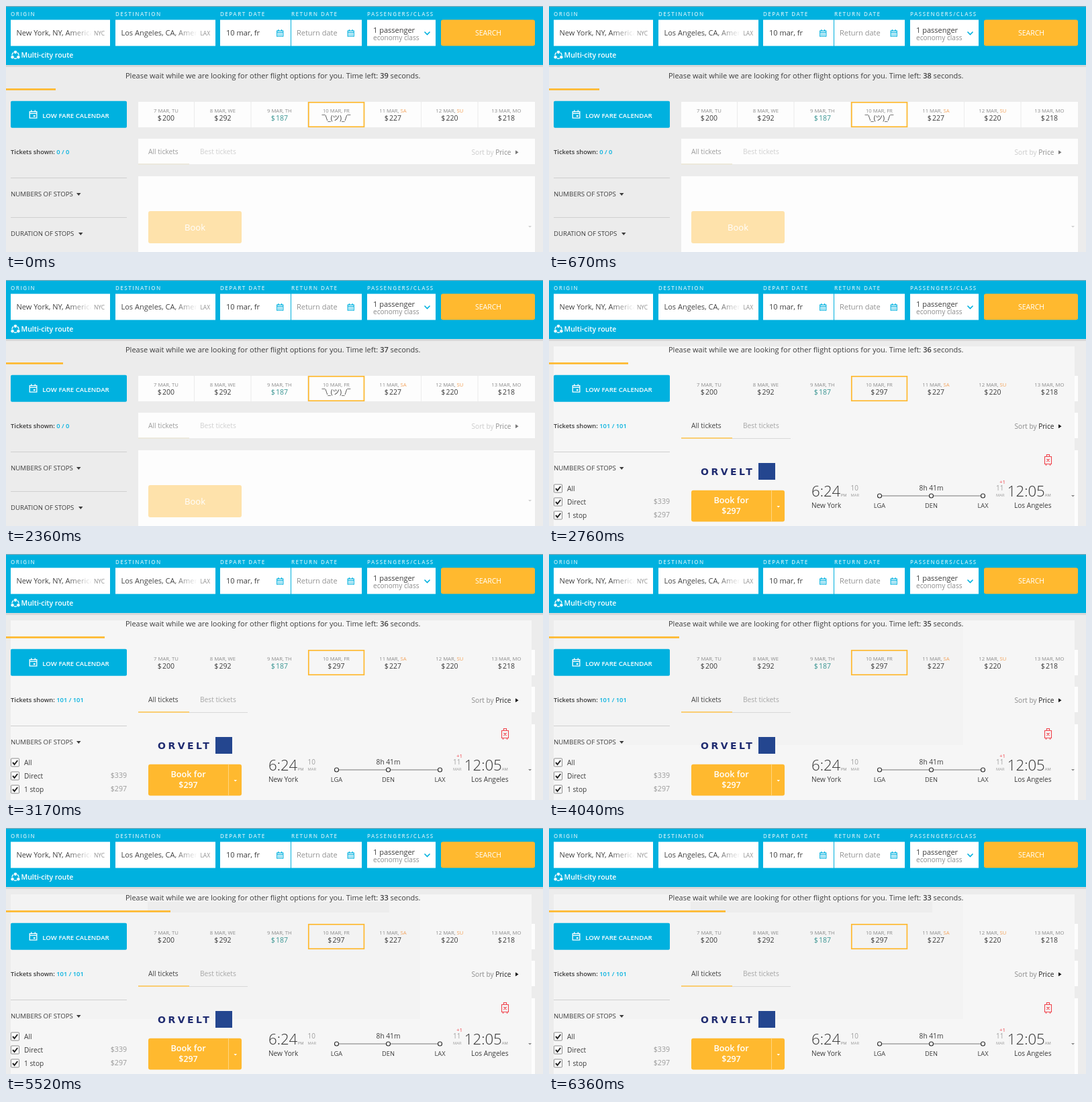
Recreate the animation shown at these times as an HTML page. Size 800 px wide and 367 px high, loop 6460 ms.

```html
<!DOCTYPE html>
<html lang="en">
<head>
<meta charset="utf-8">
<title>Flight search</title>
<style>
html, body { margin: 0; width: 100%; height: 100%; overflow: hidden; background: #ececec; }
svg { display: block; width: 100%; height: 100%; font-family: "Open Sans", "Noto Sans CJK JP", "Noto Sans", sans-serif; }
text { white-space: pre; }
</style>
</head>
<body>
<svg id="stage" viewBox="0 0 800 367"></svg>
<script>
const LOOP = 6460, RESULTS = 2630;
const BLUE = '#00b1df', GOLD = '#ffb92f', INK = '#3c3c3c';
const STEPS = [0, 120, 270, 390, 540, 670, 810, 960, 1080, 1230, 1380, 1500, 1650, 1800, 1920, 2080,
  2230, 2360, 2630, 2760, 2910, 3030, 3170, 3290, 3420, 3540, 3660, 3800, 3920, 4040, 4160, 4280,
  4430, 4550, 4700, 4820, 4980, 5130, 5250, 5370, 5520, 5670, 5790, 5940, 6060, 6210, 6360];
const TICKS = [540, 1500, 2630, 3540, 4550, 5520];

const rect = (x, y, w, h, fill, more = '') =>
  `<rect x="${x}" y="${y}" width="${w}" height="${h}" fill="${fill}" ${more}/>`;
const text = (x, y, size, fill, str, more = '') =>
  `<text x="${x}" y="${y}" font-size="${size}" fill="${fill}" ${more}>${str}</text>`;
const path = (d, stroke, width = 1, fill = 'none') =>
  `<path d="${d}" stroke="${stroke}" stroke-width="${width}" fill="${fill}"/>`;
const group = (id, body) => `<g id="${id}">${body}</g>`;
const MID = 'text-anchor="middle"', END = 'text-anchor="end"', SEMI = 'font-weight="600"';

const label = (x, str) => text(x, 15, 8, '#c4ecf7', str, SEMI + ' letter-spacing="1.5"');
const down = (x, y, w, h, fill) => path(`M${x} ${y}h${w}l${-w / 2} ${h}z`, 'none', 0, fill);

// Calendar outline with its days drawn by the given path.
const calendar = (x, y, s, color, cells) =>
  `<g transform="translate(${x} ${y}) scale(${s})">` +
  path('M.7 2.2H10.3V10.8H.7zM.7 4.7H10.3M3 0V3M8 0V3', color, 1.2) + path(cells, color, 1.2) + '</g>';
const GRID = 'M2.3 6.6h1.4m1 0h1.4m1 0h1.4M2.3 8.8h1.4m1 0h1.4m1 0h1.4';
const ONE_DAY = 'M5.8 7.6h2.4M5.8 8.6h2.4';

const box = (x, w) => rect(x, 20.6, w, 39, '#fff');

function field(x, w, str, code) {
  const edge = x + w - 27;
  return box(x, w) + text(x + 8.5, 44, 11, '#444', str) +
    rect(edge - 36, 30, 36, 22, 'url(#fade)') + rect(edge, 30, 27, 22, '#fff') +
    text(x + w - 8, 43.5, 8.4, '#8f8f8f', code, END);
}

function header() {
  return rect(0, 0, 800, 88, BLUE) + rect(0, 0, 800, 1, '#94a9b0') + rect(0, 88, 800, 3, '#d8d8d8') +
    label(7, 'ORIGIN') + label(163, 'DESTINATION') + label(319, 'DEPART DATE') +
    label(425, 'RETURN DATE') + label(538, 'PASSENGERS/CLASS') +
    field(7, 148, 'New York, NY, America', 'NYC') + field(163, 149, 'Los Angeles, CA, America', 'LAX') +
    box(319, 105) + text(328, 44, 11, INK, '10 mar, fr') + calendar(403, 35, .95, BLUE, GRID) +
    box(425, 105) + text(433, 44, 11, '#929292', 'Return date') + calendar(508.5, 35, .95, BLUE, GRID) +
    box(538, 102) + text(547, 40, 11, INK, '1 passenger') +
    text(547, 51, 10.1, '#8c8c8c', 'economy class') + path('M623.5 38.5l4 4 4-4', BLUE, 1.6) +
    rect(648, 20.6, 140, 39, GOLD, 'rx="3"') + text(718.5, 44.3, 10.5, '#fff', 'SEARCH', MID) +
    '<circle cx="14" cy="73.5" r="5" fill="none" stroke="#fff" stroke-width="1.3"/>' +
    [[14, 68.8], [9.6, 76.3], [18.4, 76.3]].map(([x, y]) =>
      `<circle cx="${x}" cy="${y}" r="2.7" fill="#fff" stroke="${BLUE}" stroke-width=".9"/>`).join('') +
    text(22.5, 77, 10.5, '#fff', 'Multi-city route', SEMI);
}

const DAYS = ['7 MAR, TU', '8 MAR, WE', '9 MAR, TH', '10 MAR, FR', '11 MAR, SA', '12 MAR, SU', '13 MAR, MO'];
const FARES = [200, 292, 187, 0, 227, 220, 218];
const dayX = i => 238.4 + i * 84.5;
const fare = (i, sum) => text(dayX(i), 171.4, 10.5, i === 2 ? '#3b9693' : INK, `$<tspan dx="1.4">${sum}</tspan>`, MID);

function days() {
  return DAYS.map((day, i) => {
    const [date, name] = day.split(', ');
    const tint = /S[AU]/.test(name) ? '#f3a35c' : '#8c8c8c';
    return text(dayX(i), 158.5, 7.7, '#8c8c8c', `${date}, <tspan fill="${tint}">${name}</tspan>`, MID) +
      (FARES[i] ? fare(i, FARES[i]) : '');
  }).join('') + rect(450.8, 143.8, 82.6, 36.4, 'none', `stroke="${GOLD}" stroke-width="1.7"`);
}

function tabs(all, best, sort, price, arrow) {
  return text(212, 221, 10.2, all, 'All tickets') + text(289, 221, 10.2, best, 'Best tickets') +
    text(693.5, 221.5, 10.1, sort, `Sort by <tspan fill="${price}">Price</tspan>`) +
    path('M759 215.3l4.5 3-4.5 3z', 'none', 0, arrow);
}

const shown = n => text(7, 220.7, 9.35, INK, `Tickets shown: <tspan fill="${BLUE}">${n} / ${n}</tspan>`, SEMI);

function waiting() {
  return shown(0) + text(dayX(3), 171, 10.2, INK, '¯\\_(ツ)_/¯', MID) +
    tabs('#9d9d9d', '#d0d0d0', '#cbcbcb', '#8e8e8e', '#777') +
    '<rect id="pulse" x="197" y="235" width="76" height="1.7"/>' +
    rect(7, 315, 173, 1, '#d0d0d0') + text(7, 342.7, 9.6, INK, 'DURATION OF STOPS', 'font-weight="500"') +
    down(108, 338, 6.5, 4, INK) +
    rect(212, 306, 139, 48, '#fee2ab', 'rx="3"') + text(281.5, 335, 13, '#fff', 'Book', MID) +
    down(778, 328, 5, 2.5, '#d0d0d0');
}

function check(y, name, sum) {
  return rect(7.5, y + .5, 12, 12, '#fff', 'stroke="#8a8a8a" rx="1"') +
    path(`M10 ${y + 6.5}l2.6 3 4.6-6`, '#222', 2) + text(27, y + 10.3, 10.2, INK, name) +
    text(180, y + 9.8, 10.6, '#9a9a9a', sum, END);
}

function stop(x, code) {
  return `<circle cx="${x}" cy="322" r="3" fill="#fff" stroke="#333" stroke-width="1.2"/>` +
    text(x, 340, 9.3, INK, code, MID);
}

function clock(x, time, half, dateX, date) {
  return text(x, 323, 22.2, '#333', time, 'font-weight="300"') +
    text(x + (time.length > 4 ? 56 : 43.8), 323, 5.8, '#888', half) +
    text(dateX, 314, 10, '#a0a0a0', date) + text(dateX, 323, 5.8, '#999', 'MAR');
}

function results() {
  return shown(101) + fare(3, 297) + tabs('#444', '#a6a6a6', '#8c8c8c', '#222', '#111') +
    rect(197, 235, 76, 1.7, '#fbc75c') + rect(273, 236, 87, 1, '#d8d8d8') +
    check(304.5, 'All', '') + check(324.5, 'Direct', '$339') + check(344.5, '1 stop', '$297') +
    text(226, 291, 14, '#1f2b70', 'ORVELT',
      'font-weight="700" letter-spacing="3.5" style="font-family:\'DejaVu Sans\',sans-serif"') +
    rect(312, 273, 25, 25, '#24468f') +
    rect(212, 313.8, 139, 46.7, GOLD, 'rx="3"') + rect(331, 313.8, 1, 46.7, '#ffd57f') +
    text(271.5, 333, 12.7, '#fff', 'Book for', MID + ' ' + SEMI) +
    text(271.5, 349, 12.4, '#fff', '$297', MID + ' ' + SEMI) + down(339.5, 337, 4.5, 2.5, '#fff') +
    clock(391, '6:24', 'PM', 449.5, '10') + clock(682.8, '12:05', 'AM', 666, '11') +
    text(671, 304, 8, '#f0434c', '+1') +
    text(391, 340, 10.1, INK, 'New York') + text(693, 340, 10.1, INK, 'Los Angeles') +
    text(569.5, 314.2, 10.2, INK, '8h 41m', MID) + path('M492 322H647', '#777') +
    stop(492.5, 'LGA') + stop(569.5, 'DEN') + stop(646.5, 'LAX') +
    path('M738.5 263.5h10v11h-10zM741.5 263v-2.5h4v2.5M740.5 275v2M746.5 275v2M741.5 267l4 4m0-4l-4 4', '#f0434c', 1.1) +
    down(778, 321, 5, 2.5, '#888');
}

function page() {
  const seams = DAYS.slice(1).map((_, i) => rect(280 + i * 84.5, 143, 1, 38, '#ececec')).join('');
  return '<defs><linearGradient id="fade"><stop stop-color="#fff" stop-opacity="0"/>' +
    '<stop offset="1" stop-color="#fff"/></linearGradient></defs>' +
    rect(0, 0, 800, 367, '#ececec') + header() +
    rect(197, 143, 591, 38, '#fdfdfd') + seams + rect(197, 198, 591, 38, '#fdfdfd') + rect(197, 254, 591, 113, '#fdfdfd') +
    group('cover', rect(7, 99, 776, 268, '#f6f6f6')) +
    group('shade', rect(7, 99, 610, 186, '#f3f3f3')) +
    group('band', rect(211, 110, 360, 16, '#ededed')) +
    text(178, 108.4, 11, INK, 'Please wait while we are looking for other flight options for you. ' +
      'Time left: <tspan id="left" font-weight="600"></tspan> seconds.') +
    `<rect id="bar" y="123" height="2.7" fill="${GOLD}"/>` +
    rect(7, 141.7, 173, 40, BLUE, 'rx="2"') + calendar(34.5, 155.2, 1.1, '#fff', ONE_DAY) +
    text(54.3, 166.7, 9.65, '#fff', 'LOW FARE CALENDAR', SEMI) +
    days() + rect(7, 256, 173, 1, '#cfcfcf') +
    text(7, 284, 9.7, INK, 'NUMBERS OF STOPS', 'font-weight="500"') + down(105, 279, 6.5, 4, INK) +
    group('waiting', waiting()) + group('results', results());
}

document.getElementById('stage').innerHTML = page();
const $ = id => document.getElementById(id);
const show = (id, on) => $(id).setAttribute('display', on ? 'inline' : 'none');

// Slow start, then easing out once tickets come in.
const progress = t => t < 2360 ? 74 + 2.15e-6 * t * t : 308 - 200 * Math.exp(-.0004 * (t - RESULTS));

function draw(now) {
  const time = now % LOOP;
  const t = STEPS.filter(s => s <= time).pop();
  const done = t >= RESULTS;
  show('waiting', !done);
  show('results', done);
  show('cover', done);
  show('shade', t >= 3800);
  show('band', t >= 5130);
  $('bar').setAttribute('width', Math.round(progress(t)));
  $('left').textContent = 39 - TICKS.filter(s => s <= t).length;
  const glow = Math.max(0, 1 - Math.abs(t - 1400) / 800);
  $('pulse').setAttribute('fill', `rgb(${236 + 16 * glow},${232 - 4 * glow},${218 - 34 * glow})`);
}

function loop(now) {
  draw(now);
  requestAnimationFrame(loop);
}
draw(0);
requestAnimationFrame(loop);
</script>
</body>
</html>
```
